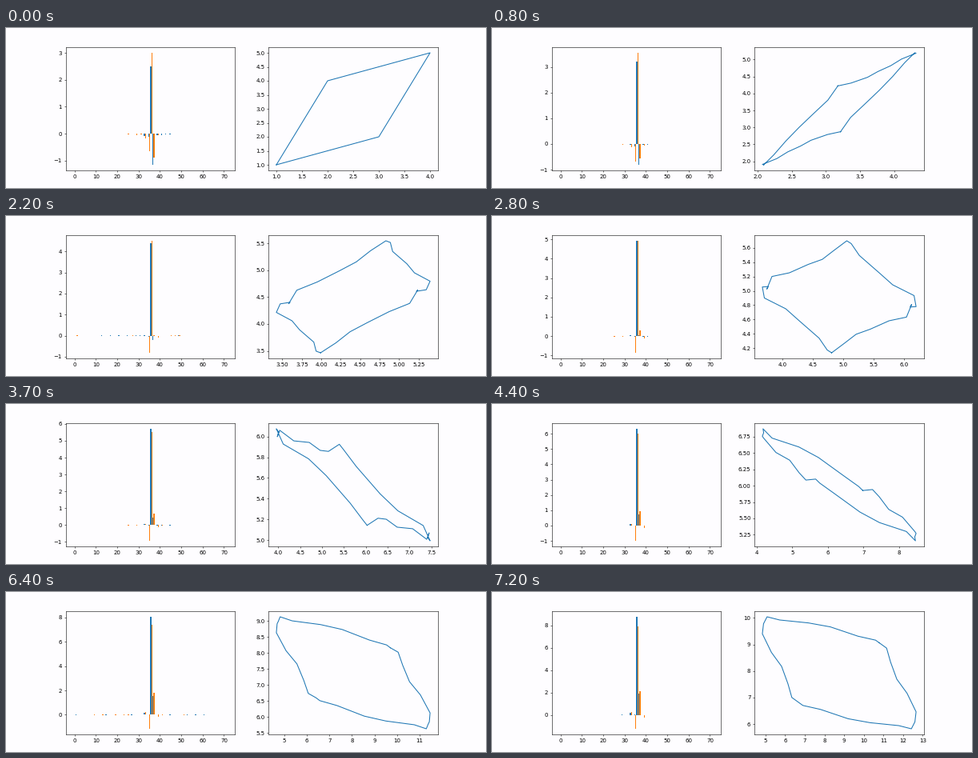
Recreate the animation shown at these times as a matplotlib script. Size 600 by 200 pixels, loop 7300 ms.

```python
import numpy as np
import matplotlib.pyplot as plt
from matplotlib.animation import FuncAnimation

FRAMES = 73
INTERVAL = 100
N = 72
HALF = N // 2
PAPER = "#fefdff"

# Start shape: a parallelogram, both end points kept on every edge.
CORNERS = np.array([1 + 1j, 2 + 4j, 4 + 5j, 3 + 2j])
start = np.concatenate([
    np.linspace(a, b, N // 4) for a, b in zip(CORNERS, np.roll(CORNERS, -1))
])

# End shape: evenly spaced key points for half of the outline;
# the other half is their reflection through the centre.
CENTRE = 8.75 + 7.93j
FIRST = 20
KEYS = np.array([
    12.42 + 5.82j, 11.78 + 5.94j, 10.32 + 6.05j, 9.2 + 6.2j,
    7.8 + 6.55j, 6.9 + 6.7j, 6.34 + 7j, 6.14 + 7.52j,
    5.82 + 8.17j, 5.3 + 8.7j, 4.84 + 9.4j, 4.9 + 9.78j,
])
ring = np.concatenate([KEYS, 2 * CENTRE - KEYS])
end = np.roll(
    np.interp(np.arange(N), np.arange(0, N, N // len(ring)), ring, period=N),
    FIRST)


def padded(values, margin=0.05):
    low, high = np.min(values), np.max(values)
    pad = margin * (high - low)
    return low - pad, high + pad


def spectrum(points):
    return np.fft.fftshift(np.fft.ifft(np.roll(points, -1)))


fig, (ax_bars, ax_shape) = plt.subplots(1, 2, figsize=(12, 4), dpi=50,
                                        facecolor=PAPER)
fig.subplots_adjust(left=0.1245, right=0.8995)
for ax in (ax_bars, ax_shape):
    ax.set_facecolor(PAPER)

index = np.arange(N)
real_bars = ax_bars.bar(index - 0.25, np.zeros(N), 0.5, color="C0")
imag_bars = ax_bars.bar(index + 0.25, np.zeros(N), 0.5, color="C1")
ax_bars.set_xlim(padded([-0.5, N - 0.5]))
outline, = ax_shape.plot([], [], color="C0")


def draw(frame):
    t = frame / (FRAMES - 1)
    points = (1 - t) * start + t * end
    coefs = spectrum(points)

    for bars, heights in ((real_bars, coefs.real), (imag_bars, coefs.imag)):
        for bar, height in zip(bars, heights):
            bar.set_height(height)
    ax_bars.set_ylim(padded([coefs.real, coefs.imag]))

    closed = np.append(points, points[0])
    outline.set_data(closed.real, closed.imag)
    ax_shape.set_xlim(padded(closed.real))
    ax_shape.set_ylim(padded(closed.imag))
    return [*real_bars, *imag_bars, outline]


anim = FuncAnimation(fig, draw, frames=FRAMES, interval=INTERVAL,
                     init_func=lambda: draw(0), repeat=True, repeat_delay=0)
plt.show()
```
